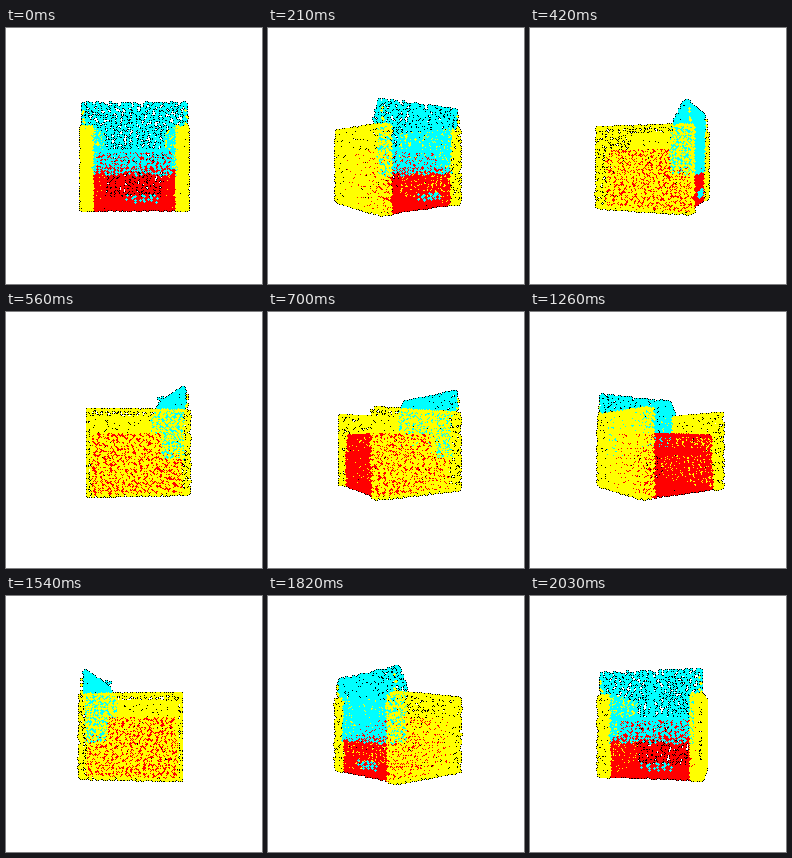
A matplotlib script for the animation above (2.1 s loop, 256 by 256 pixels).

```python
import numpy as np
import matplotlib.pyplot as plt
from matplotlib.animation import FuncAnimation

SIZE, FRAMES, LOOP_MS = 256, 30, 2100
CAMERA = 285          # distance from camera to the turning axis
DENSITY = 0.135       # points per unit of area
RED, YELLOW, CYAN = (255, 0, 0), (255, 255, 0), (0, 255, 255)

rng = np.random.default_rng(5)
points, colors = [], []


def quad(color, a, b, c, d, density=DENSITY):
    """Scatter evenly spaced points over the quad a-b-c-d."""
    a, b, c, d = (np.array(p, float) for p in (a, b, c, d))
    area = (np.linalg.norm(np.cross(b - a, d - a))
            + np.linalg.norm(np.cross(b - c, d - c))) / 2
    n = max(3, int(area * density))
    k = np.arange(n)[:, None]
    uv = rng.random(2) + k * [0.7548776662, 0.5698402910]
    uv = (uv + rng.normal(0, 0.22 / np.sqrt(n), (n, 2))) % 1
    u, v = uv[:, :1], uv[:, 1:]
    points.append((1 - u) * (1 - v) * a + u * (1 - v) * b
                  + u * v * c + (1 - u) * v * d)
    colors.append(np.tile(color, (n, 1)))


def plane_x(color, x, y0, y1, z0, z1, **kw):
    quad(color, (x, y0, z0), (x, y1, z0), (x, y1, z1), (x, y0, z1), **kw)


def plane_y(color, y, x0, x1, z0, z1, **kw):
    quad(color, (x0, y, z0), (x1, y, z0), (x1, y, z1), (x0, y, z1), **kw)


def plane_z(color, z, x0, x1, y0, y1, **kw):
    quad(color, (x0, y0, z), (x1, y0, z), (x1, y1, z), (x0, y1, z), **kw)


def box(color, x0, x1, y0, y1, z0, z1, **kw):
    for x in (x0, x1):
        plane_x(color, x, y0, y1, z0, z1, **kw)
    for y in (y0, y1):
        plane_y(color, y, x0, x1, z0, z1, **kw)
    for z in (z0, z1):
        plane_z(color, z, x0, x1, y0, y1, **kw)


def slope(color, w, y0, z0, y1, z1):
    quad(color, (-w, y0, z0), (w, y0, z0), (w, y1, z1), (-w, y1, z1))


def build_chair():
    # arms
    for s in (-1, 1):
        box(YELLOW, s * 36, s * 46, -44, 43, -46.5, 26)
        plane_y(YELLOW, 41, s * 42.5, s * 45.5, 26, 40)

    # base and seat cushion
    box(RED, -35, 35, -40, 39, -46.5, -12)
    box(RED, -35, 35, -39, 20, -9, 5, density=0.11)

    # backrest: rear, front and top
    slope(CYAN, 36, 40, -16, 40, 26)
    slope(CYAN, 45, 40, 26, 38, 46.5)
    slope(CYAN, 36, 22, -14, 26, 26)
    slope(CYAN, 44, 26, 26, 33, 41)
    slope(CYAN, 44, 33, 41, 38, 46.5)
    plane_x(CYAN, 0, 24, 38, 5, 44)
    plane_z(CYAN, 5, -36, 36, 22, 40)
    for s in (-1, 1):
        plane_x(CYAN, s * 36, 22, 40, -16, 26, density=0.2)
        quad(CYAN, (s * 44.5, 26, 26), (s * 45, 40, 26),
             (s * 45, 39, 46), (s * 44.5, 36, 45))
    plane_y(CYAN, 41, -7, 20, -40, -33, density=0.11)


build_chair()
points, colors = np.vstack(points), np.vstack(colors).astype(np.uint8)

CROSS = [(0, 0), (1, 0), (-1, 0), (0, 1), (0, -1)]
CORNERS = [(1, 1), (1, -1), (-1, 1), (-1, -1)]


def render(i):
    turn = 2 * np.pi * i / FRAMES
    x, y, z = points.T
    side = x * np.cos(turn) + y * np.sin(turn)
    near = y * np.cos(turn) - x * np.sin(turn)
    scale = CAMERA / (CAMERA - near)
    col = np.rint(SIZE / 2 + side * scale).astype(int)
    row = np.rint(SIZE / 2 - z * scale).astype(int)

    img = np.full((SIZE, SIZE, 3), 255, np.uint8)
    for dx, dy in CORNERS:
        img[row + dy, col + dx] = 0
    order = np.argsort(near)
    col, row, rgb = col[order], row[order], colors[order]
    dx, dy = np.array(CROSS).T
    img[(row[:, None] + dy).ravel(), (col[:, None] + dx).ravel()] = \
        np.repeat(rgb, len(CROSS), axis=0)
    return img


fig = plt.figure(figsize=(2.56, 2.56), dpi=100, facecolor="white")
ax = fig.add_axes([0, 0, 1, 1])
ax.axis("off")
view = ax.imshow(render(0), interpolation="nearest", aspect="auto")


def update(i):
    view.set_data(render(i))
    return [view]


anim = FuncAnimation(fig, update, frames=FRAMES, interval=LOOP_MS / FRAMES,
                     repeat=True, repeat_delay=0)
plt.show()
```
